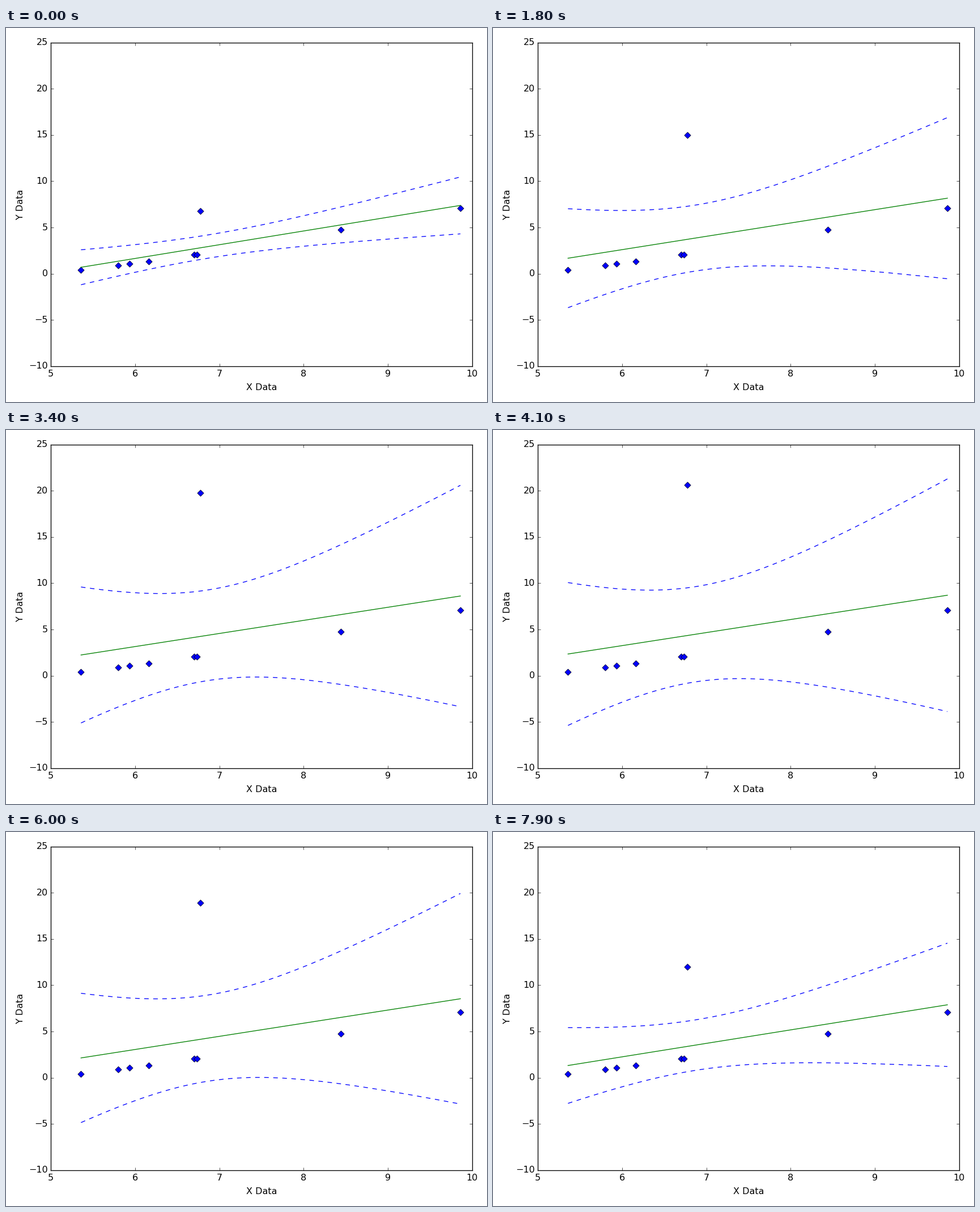
Write a matplotlib script that moves like this. It is 849 px wide and 660 px high and loops after 8 s.

```python
import numpy as np
import matplotlib.pyplot as plt
from matplotlib.animation import FuncAnimation

W, H, DPI = 849, 660, 96
FRAMES, INTERVAL = 80, 100

# Axes edges and text baselines in pixels from the top left
LEFT, RIGHT, TOP, BOTTOM = 79.28, 822.72, 25.78, 596.72
TICK_BASE, XLABEL_BASE, YLABEL_BASE = 615.05, 638.72, 30.28

plt.style.use("classic")
plt.rcParams.update({
    "font.family": "DejaVu Sans",
    "font.size": 12,
    "figure.facecolor": "white",
    "savefig.dpi": "figure",
})

X = np.array([5.357, 5.797, 5.936, 6.161, 6.697, 6.731, 6.775, 8.442, 9.861])
Y = np.array([0.376, 0.874, 1.049, 1.327, 2.054, 2.077, 6.775, 4.744, 7.104])
MOVING = 6         # index of the swinging outlier
SWING = 14.0
T_95 = 2.364624    # Student t, 7 degrees of freedom, two-sided 95 %

grid = np.linspace(X.min(), X.max(), 100)


def data_at(i):
    y = Y.copy()
    y[MOVING] += SWING * np.sin(np.radians(2 * i))
    return y


def fit(y):
    """Least-squares line over the grid and its 95 % confidence half-width."""
    dx = X - X.mean()
    sxx = (dx ** 2).sum()
    slope = (dx * y).sum() / sxx
    residual = y - y.mean() - slope * dx
    s = np.sqrt((residual ** 2).sum() / (len(X) - 2))
    d = grid - X.mean()
    return y.mean() + slope * d, T_95 * s * np.sqrt(1 / len(X) + d ** 2 / sxx)


def label(x, y, text, rotation=0):
    fig.text(x / W, 1 - y / H, text, rotation=rotation, ha="center",
             va="baseline", rotation_mode="anchor")


fig = plt.figure(figsize=(W / DPI, H / DPI), dpi=DPI)
ax = fig.add_axes([LEFT / W, 1 - BOTTOM / H,
                   (RIGHT - LEFT) / W, (BOTTOM - TOP) / H])
ax.set_xlim(5, 10)
ax.set_ylim(-10, 25)
ax.tick_params(axis="x", pad=(TICK_BASE - BOTTOM) * 72 / DPI)
for tick in ax.get_xticklabels():
    tick.set_va("baseline")
label((LEFT + RIGHT) / 2, XLABEL_BASE, "X Data")
label(YLABEL_BASE, (TOP + BOTTOM) / 2, "Y Data", 90)

# A four-sided polygon marker keeps the diamond symmetric
points, = ax.plot(X, Y, ls="none", marker=(4, 0, 0), ms=6 * np.sqrt(2),
                  color="b")
line, = ax.plot(grid, grid, color="g")
upper, = ax.plot(grid, grid, "b--")
lower, = ax.plot(grid, grid, "b--")


def draw(i):
    y = data_at(i)
    mid, half = fit(y)
    points.set_ydata(y)
    line.set_ydata(mid)
    upper.set_ydata(mid + half)
    lower.set_ydata(mid - half)
    return points, line, upper, lower


anim = FuncAnimation(fig, draw, frames=FRAMES, interval=INTERVAL,
                     repeat=True, repeat_delay=0, blit=False)
plt.show()
```
